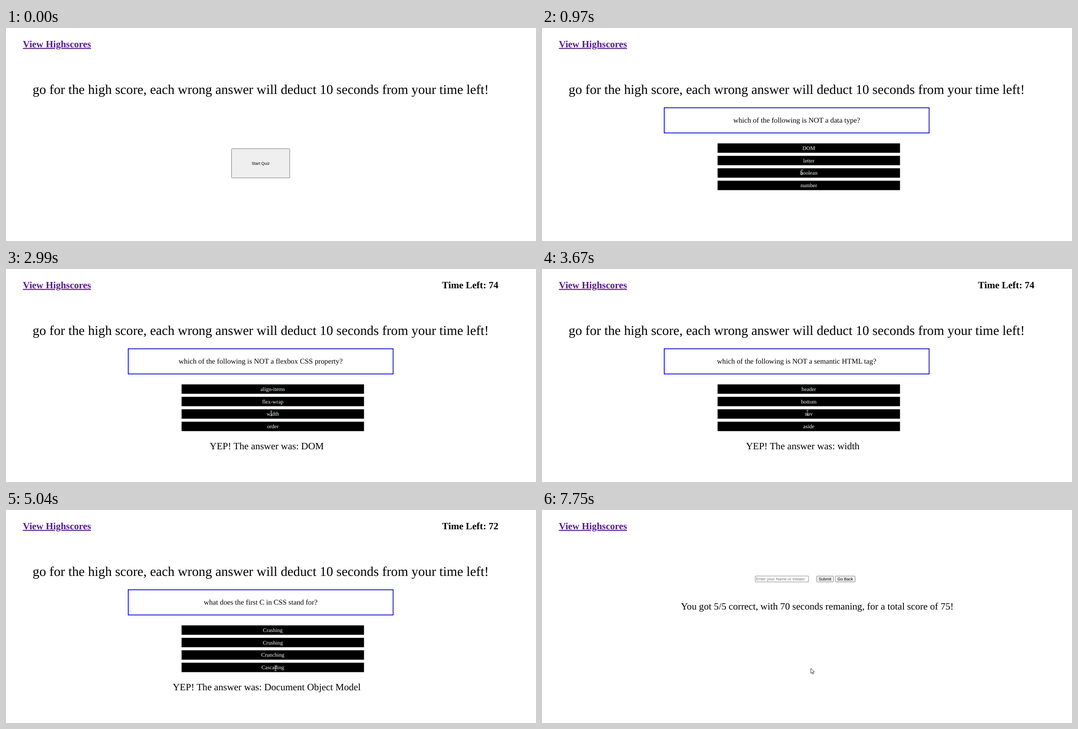
An HTML page for the animation above (8 s loop, 1179 px wide and 475 px high).

```html
<!DOCTYPE html>
<html lang="en">
<head>
<meta charset="utf-8">
<title>Quiz</title>
<style>
  html, body { margin: 0; width: 100%; height: 100%; overflow: hidden; background: #fff; }
  svg { display: block; width: 100vw; height: 100vh; }
  text {
    font-family: "Liberation Serif", "Times New Roman", serif;
    font-variant-ligatures: none;
    text-rendering: geometricPrecision;
  }
  .mid { text-anchor: middle; }
  .head { font-size: 29.75px; }
  .link { font-size: 21.4px; font-weight: bold; fill: #551a8b; text-decoration: underline; }
  .time { font-size: 21.55px; font-weight: bold; }
  .ask { font-size: 16.25px; }
  .answer { font-size: 12.15px; fill: #f5fffa; }
  .note { font-size: 21.6px; }
  .ui { font: 9px "Liberation Sans", Arial, sans-serif; }
  .button { fill: #efefef; stroke: #767676; }

  /* 1% = 80 ms */
  .anim { animation: 8s step-end -5ms infinite; }
  .intro { animation-name: intro; }
  .start { animation-name: start; }
  .hover { animation-name: hover; }
  .quiz { animation-name: quiz; }
  .q1 { animation-name: q1; }
  .q2 { animation-name: q2; }
  .q3 { animation-name: q3; }
  .q4 { animation-name: q4; }
  .q5 { animation-name: q5; }
  .t75 { animation-name: t75; }
  .t74 { animation-name: t74; }
  .t73 { animation-name: t73; }
  .t72 { animation-name: t72; }
  .finish { animation-name: finish; }
  .result { animation-name: result; }
  .cursor { animation-name: cursor; }

  @keyframes intro { 0% { opacity: 1 } 96.875%, 100% { opacity: 0 } }
  @keyframes start { 0% { opacity: 1 } 12.125%, 100% { opacity: 0 } }
  @keyframes hover {
    0% { fill: #efefef; stroke: #767676 }
    3.75%, 100% { fill: #e5e5e5; stroke: #4f4f4f }
  }
  @keyframes quiz { 0%, 96.875%, 100% { opacity: 0 } 12.125% { opacity: 1 } }
  @keyframes q1 { 0%, 29%, 100% { opacity: 0 } 12.125% { opacity: 1 } }
  @keyframes q2 { 0%, 43.25%, 100% { opacity: 0 } 29% { opacity: 1 } }
  @keyframes q3 { 0%, 54.25%, 100% { opacity: 0 } 43.25% { opacity: 1 } }
  @keyframes q4 { 0%, 63%, 100% { opacity: 0 } 54.25% { opacity: 1 } }
  @keyframes q5 { 0%, 96.875%, 100% { opacity: 0 } 63% { opacity: 1 } }
  @keyframes t75 { 0%, 37.375%, 100% { opacity: 0 } 24.875% { opacity: 1 } }
  @keyframes t74 { 0%, 50.125%, 100% { opacity: 0 } 37.375% { opacity: 1 } }
  @keyframes t73 { 0%, 63%, 100% { opacity: 0 } 50.125% { opacity: 1 } }
  @keyframes t72 { 0%, 72.125%, 100% { opacity: 0 } 63% { opacity: 1 } }
  @keyframes finish { 0%, 96.875%, 100% { opacity: 0 } 72.125% { opacity: 1 } }
  @keyframes result { 0% { opacity: 0 } 96.875%, 100% { opacity: 1 } }

  .arrow { opacity: var(--arrow); fill: #fff; stroke: #000; stroke-width: .8; }
  .beam { opacity: calc(1 - var(--arrow)); fill: none; stroke: #e8f0ee; stroke-width: .9; }
  .halo { opacity: var(--halo); fill: #ffec00; }

  @keyframes cursor {
    0% { transform: translate(1300px, 520px); --arrow: 1; --halo: 0 }
    1.25% { transform: translate(1045px, 466px) }
    2.125% { transform: translate(905px, 412px) }
    2.875% { transform: translate(745px, 362px) }
    3.75% { transform: translate(628px, 332px) }
    4.625% { transform: translate(579.5px, 323.5px) }
    7.125% { transform: translate(578.5px, 322.5px) }
    8% { transform: translate(578px, 321.5px) }
    11.25% { --halo: .65 }
    12.125% { --arrow: 0; --halo: 0 }
    18.75% { transform: translate(579px, 318px) }
    19.625% { transform: translate(581px, 311px); --arrow: 1 }
    20.5% { transform: translate(584px, 303px); --arrow: 0 }
    21.5% { transform: translate(586px, 297px) }
    22.375% { transform: translate(587.5px, 293px) }
    24.875% { transform: translate(587px, 288px) }
    25.75% { transform: translate(586px, 281px); --arrow: 1 }
    26.625% { transform: translate(584.5px, 275px); --arrow: 0 }
    27.375% { transform: translate(583.8px, 273px); --halo: .65 }
    29% { --halo: 0 }
    29.875% { transform: translate(584px, 275px) }
    30.75% { transform: translate(585px, 283px); --arrow: 1 }
    31.625% { transform: translate(587px, 296px); --arrow: 0 }
    33.25% { transform: translate(589px, 309px); --arrow: 1 }
    34.125% { transform: translate(590px, 320px); --arrow: 0 }
    37.375% { transform: translate(590px, 322px) }
    38.25% { transform: translate(590.5px, 326px) }
    39.125% { transform: translate(591px, 324px) }
    41.625% { --halo: .65 }
    43.25% { --halo: 0 }
    45% { transform: translate(591px, 322px) }
    45.875% { transform: translate(590.5px, 320.5px) }
    46.75% { transform: translate(590px, 315px) }
    47.5% { transform: translate(590px, 309px); --arrow: 1 }
    48.375% { transform: translate(591px, 302px); --arrow: 0 }
    49.25% { transform: translate(592px, 298px) }
    51% { transform: translate(592px, 296px) }
    52.625% { --halo: .65 }
    54.25% { --halo: 0 }
    56% { transform: translate(593px, 302px) }
    56.875% { transform: translate(596px, 309px); --arrow: 1 }
    57.75% { transform: translate(599px, 325px); --arrow: 0 }
    58.75% { transform: translate(602.5px, 338px); --arrow: 1 }
    59.625% { transform: translate(602px, 347px); --arrow: 0 }
    60.5% { transform: translate(601px, 352px) }
    62.25% { transform: translate(599.5px, 353px); --halo: .65 }
    63% { --halo: 0 }
    70.5% { --halo: .65 }
    72.125% { --halo: 0 }
    96.875%, 100% { transform: translate(598px, 353px); --arrow: 1; --halo: 0 }
  }
</style>
</head>
<body>
<svg viewBox="0 0 1179 475">
  <text class="link" x="37.5" y="42.5">View Highscores</text>
  <text class="anim time t75" x="970" y="42.5">Time Left: 75</text>
  <text class="anim time t74" x="970" y="42.5">Time Left: 74</text>
  <text class="anim time t73" x="970" y="42.5">Time Left: 73</text>
  <text class="anim time t72" x="970" y="42.5">Time Left: 72</text>

  <text class="anim intro head mid" x="566.6" y="146.5">go for the high score, each wrong answer will deduct 10 seconds from your time left!</text>

  <g class="anim start">
    <rect class="anim button hover" x="501.7" y="269.2" width="129.5" height="65" rx="1.2"/>
    <text class="ui mid" x="566.4" y="304.6">Start Quiz</text>
  </g>

  <g class="anim quiz" id="quiz">
    <rect x="271.9" y="177.9" width="589.3" height="56.2" fill="none" stroke="#0000cd" stroke-width="1.7"/>
  </g>
  <g id="questions"></g>
  <text class="anim finish note mid" x="580" y="426.3">FINISH! You got 5/5 correct.</text>

  <g class="anim result">
    <rect x="474.3" y="147.2" width="118.8" height="13.2" rx="1" fill="#fff" stroke="#767676" stroke-width=".9"/>
    <text class="ui" x="476.2" y="157" fill="#757575">Enter your Name or Initials!</text>
    <rect class="button" x="610.8" y="147.2" width="37.6" height="13.2" rx="1.6" stroke-width=".9"/>
    <text class="ui mid" x="629.6" y="157">Submit</text>
    <rect class="button" x="652.2" y="147.2" width="44.4" height="13.2" rx="1.6" stroke-width=".9"/>
    <text class="ui mid" x="674.4" y="157">Go Back</text>
    <text class="note mid" x="612.2" y="222">You got 5/5 correct, with 70 seconds remaning, for a total score of 75!</text>
  </g>

  <g class="anim cursor">
    <circle class="halo" r="8"/>
    <path class="arrow" d="M0 0V11.3L2.6 8.9 4.3 12.9 6 12.2 4.3 8.3H7.9Z"/>
    <path class="beam" d="M-2.5-5.3H2.5M0-5.3V5.3M-2.5 5.3H2.5"/>
  </g>
</svg>
<script>
  const questions = [
    ["which of the following is NOT a data type?", ["DOM", "letter", "boolean", "number"]],
    ["which of the following is NOT a flexbox CSS property?", ["align-items", "flex-wrap", "width", "order"], "DOM"],
    ["which of the following is NOT a semantic HTML tag?", ["header", "bottom", "nav", "aside"], "width"],
    ["what does the acronym DOM stand for in programming?",
      ["Domination", "Days on Market", "Day of Month", "Document Object Model"], "bottom"],
    ["what does the first C in CSS stand for?", ["Crashing", "Crushing", "Crunching", "Cascading"], "Document Object Model"]
  ];
  const rowStep = 27.75;

  function add(parent, tag, attrs, content = "") {
    const el = document.createElementNS("http://www.w3.org/2000/svg", tag);
    for (const key in attrs) el.setAttribute(key, attrs[key]);
    el.textContent = content;
    return parent.appendChild(el);
  }
  const label = (parent, kind, x, y, content) =>
    add(parent, "text", { class: kind + " mid", x, y }, content);

  for (let i = 0; i < 4; i++) {
    add(document.getElementById("quiz"), "rect",
      { x: 390.6, y: 257.3 + rowStep * i, width: 405.8, height: 21 });
  }
  questions.forEach(([ask, answers, last], n) => {
    const group = add(document.getElementById("questions"), "g", { class: "anim q" + (n + 1) });
    label(group, "ask", 566.5, 210.5, ask);
    answers.forEach((answer, i) => label(group, "answer", 593.5, 271.8 + rowStep * i, answer));
    if (last) label(group, "note", 580, 401.5, "YEP! The answer was: " + last);
  });
</script>
</body>
</html>
```
